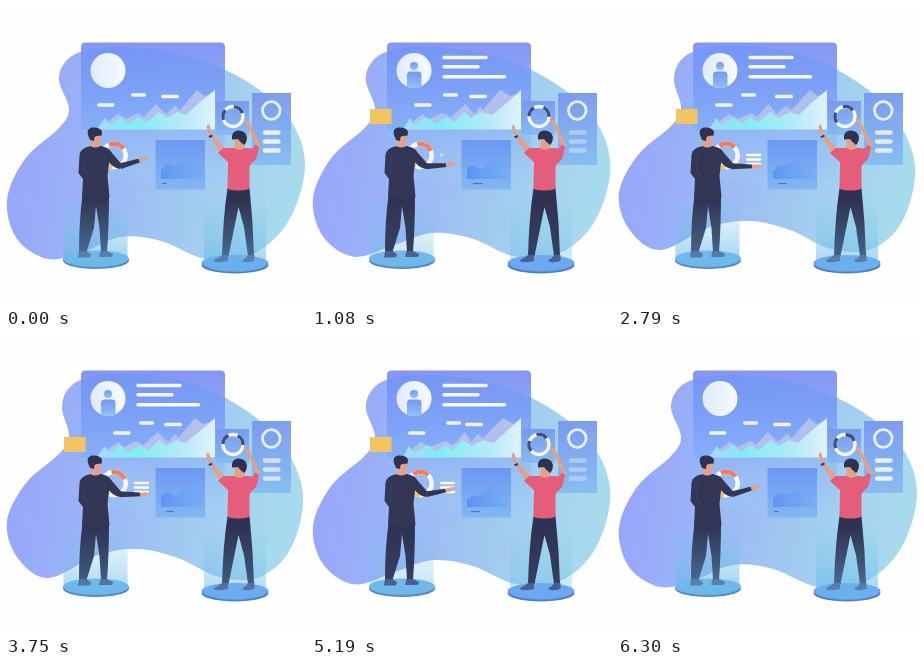
Animation, 300 px wide and 300 px high, one loop 6.33 s. Source, as an HTML page:

```html
<!DOCTYPE html>
<html lang="en">
<head>
<meta charset="utf-8">
<title>Dashboard team</title>
<style>
html, body { margin: 0; width: 100%; height: 100%; overflow: hidden; background: #fefefe; }
svg { display: block; width: 100vw; height: 100vh; }
.line { fill: none; stroke: #fff; stroke-linecap: round; }
.skin { fill: #e2a188; }
.hair { fill: #2f3150; }
.jacket { fill: #343656; }
.trousers { fill: #2f3252; }
.shoe { fill: #475583; }
</style>
</head>
<body>
<svg viewBox="0 0 300 300">
  <defs>
    <linearGradient id="gBlob" x1="0" y1="0" x2="1" y2="0.12">
      <stop stop-color="#96a2fb"/><stop offset=".3" stop-color="#9ab1f8"/>
      <stop offset=".65" stop-color="#a0c8f0"/><stop offset="1" stop-color="#a8daee"/>
    </linearGradient>
    <linearGradient id="gPanel" x1="0" y1="0" x2="0" y2="1">
      <stop stop-color="#7b8ff3" stop-opacity=".94"/><stop offset=".5" stop-color="#829ef4" stop-opacity=".88"/>
      <stop offset="1" stop-color="#96b8f6" stop-opacity=".8"/>
    </linearGradient>
    <linearGradient id="gLower" x1="0" y1="0" x2="0" y2="1">
      <stop stop-color="#8eb4f5" stop-opacity=".65"/><stop offset="1" stop-color="#9cc8f4" stop-opacity=".35"/>
    </linearGradient>
    <linearGradient id="gSide" x1="0" y1="0" x2="0" y2="1">
      <stop stop-color="#7798ef" stop-opacity=".95"/><stop offset="1" stop-color="#82b9f0" stop-opacity=".85"/>
    </linearGradient>
    <linearGradient id="gCard" x1="0" y1="0" x2="0" y2="1">
      <stop stop-color="#6c98f2"/><stop offset="1" stop-color="#82b8f2"/>
    </linearGradient>
    <linearGradient id="gBars" gradientUnits="userSpaceOnUse" x1="155" y1="173" x2="196" y2="152">
      <stop stop-color="#4f83f4"/><stop offset="1" stop-color="#76aef4" stop-opacity=".5"/>
    </linearGradient>
    <linearGradient id="gArea" x1="0" y1="0" x2="1" y2="0">
      <stop stop-color="#a5dcf8"/><stop offset=".3" stop-color="#7cf0f4"/>
      <stop offset=".7" stop-color="#b2ecf8"/><stop offset="1" stop-color="#e2f4fb"/>
    </linearGradient>
    <linearGradient id="gAvatar">
      <stop stop-color="#dfeafb"/><stop offset="1" stop-color="#f6fbff"/>
    </linearGradient>
    <linearGradient id="gBust" x1="0" y1="0" x2="0" y2="1">
      <stop stop-color="#7298f2"/><stop offset="1" stop-color="#94bff8"/>
    </linearGradient>
    <linearGradient id="gBeam" x1="0" y1="0" x2="0" y2="1">
      <stop stop-color="#78cbea" stop-opacity="0"/><stop offset=".5" stop-color="#70c2e8" stop-opacity=".3"/>
      <stop offset="1" stop-color="#68b8ea" stop-opacity=".65"/>
    </linearGradient>
    <clipPath id="panelClip"><path d="M75 124V41q0-4 4-4H215q4 0 4 4V124Z"/></clipPath>
    <g id="beamShapes" fill="url(#gBeam)">
      <path d="M57.500 190H121.500V253A32 8.500 0 0 1 57.500 253Z"/>
      <path d="M198 193H260V257.500A31 8.500 0 0 1 198 257.500Z"/>
    </g>
  </defs>

  <path id="blob" fill="url(#gBlob)"/>

  <path d="M75 124V41q0-4.500 4.500-4.500H214.500q4.500 0 4.500 4.500V124Z" fill="url(#gPanel)"/>
  <g clip-path="url(#panelClip)"><path id="sheen" fill="#669bfa" opacity=".34"/></g>
  <path d="M75 124H219V174H75Z" fill="url(#gLower)"/>

  <circle cx="102" cy="64.500" r="17.500" fill="url(#gAvatar)"/>
  <g id="bust" fill="url(#gBust)">
    <circle cx="102" cy="60" r="4"/>
    <path d="M95 81V69q0-3.500 3.500-3.500h7.500q3.500 0 3.500 3.500V81q-7 2-14.500 0Z"/>
  </g>
  <g id="titles" class="line" stroke-width="3.500" opacity=".93"></g>
  <g id="pills" class="line" stroke-width="3.600" opacity=".88"></g>

  <path id="backArea" fill="#bcc5ec" opacity=".85"/>
  <path id="frontArea" fill="url(#gArea)" opacity=".95"/>

  <path id="note" d="M58 103H79.500V118H58Z" fill="#f1c662"/>

  <g fill="none" stroke-width="4.500">
    <circle cx="108" cy="149.500" r="11.700" stroke="#f4f7fe"/>
    <path id="orangeArc" stroke="#ee8060"/><path id="yellowArc" stroke="#f1c662"/>
  </g>
  <g id="notes" class="line" stroke-width="2.300"></g>

  <rect x="149.500" y="134" width="49.500" height="49.500" fill="url(#gCard)"/>
  <g id="bars" fill="url(#gBars)"></g>
  <path id="cardDash" stroke="#4b73d8" stroke-width="1.200"/>

  <rect x="210" y="95" width="33" height="34" fill="url(#gSide)"/>
  <g fill="none" stroke-width="3.300">
    <circle cx="227" cy="110.500" r="10" stroke="#f4f7fe"/>
    <path id="darkArcA" stroke="#40507c"/><path id="darkArcB" stroke="#40507c"/>
  </g>
  <rect x="246" y="87" width="39" height="72" fill="url(#gSide)"/>
  <circle cx="265.300" cy="104.500" r="8.800" class="line" stroke-width="2.800" opacity=".82"/>
  <g id="sideLines" class="line" stroke-width="4.400"><path d="M259 126.500h13.500M259 135.500h13.500M259 144.500h13.500"/></g>

  <g id="discs"></g>
  <use href="#beamShapes" opacity=".55"/>

  <!-- presenter in a suit -->
  <g>
    <path class="trousers" d="M76.500 189H103Q103 220 101 246H95L93.500 222 90 200 88 222 80.500 246H73Q73 215 76.500 189Z"/>
    <path class="shoe" d="M73 245h7.500l4.500 3.500q0 2.500-3 3H72ZM94.500 245h6.500l6 3q0 3-3 3H93Z"/>
    <g id="forearm">
      <path class="jacket" d="M113 157.500 133 154 134.500 157.500 115 163Z"/>
      <path class="skin" d="M133 154.300q6-2.500 9.500-2.200 1.500.5.500 1.700l-5 3-4 .7Z"/>
    </g>
    <path class="jacket" d="M98 141q5 1 8 6l10 11.500-2 4.500q-8-1-14-11Z"/>
    <path class="jacket" d="M85 140Q74 142 73.500 149L72.500 167 77 173 76 191Q90 194 103.500 191L101.500 170 104 148Q103 142 95 140Z"/>
    <path d="M79 150 78.500 166 84 171" fill="none" stroke="#444867" stroke-width=".7"/>
    <path class="skin" d="M85 134h8.500v6.500q-4 2-8.500 0Z"/>
    <path class="skin" d="M83 127q1-4 6-4.500 6 0 6.500 5l-.5 7q-5 4-9.500.5Z"/>
    <path class="hair" d="M82 129q-2-6 4-7.500 8-.5 10 4l-.300 4-5.200.5-2 1-.5 4-4-1Z"/>
  </g>

  <!-- colleague in a red shirt -->
  <g>
    <path class="trousers" d="M221.500 182H243.500Q247 215 248 250H242L238 221 232.500 201 228 223 222.500 250H216Q217 212 221.500 182Z"/>
    <path class="shoe" d="M216 249h6v6q-7 2-14 .5 0-2.500 4-3.500ZM242 249h6.500v6q-6 2-12 .5 0-2.500 3-3Z"/>
    <g id="wave">
      <path class="skin" d="M214 147 203 129 200.500 121q1-4 3-2l2.200 9 12 13Z"/>
      <path d="M203 131 206.500 129.500" stroke="#34395c" stroke-width="2"/>
    </g>
    <path class="skin" d="M246 145 250 139 242 121 237.500 114q0-2 2-2l5 6.500L254 138 252 147Z"/>
    <path d="M212 147 217.500 142 230 142H240L247 142.500 249.500 138.500 253 141 250.500 152 243.500 160 243.500 183Q232 186 221.500 183L222 156Z" fill="#e45d7a"/>
    <path class="skin" d="M229 137h8.500l1 5q-5 3.500-10.500 0Z"/>
    <path class="skin" d="M227 130q1-5 7-5 6 1 6 7l-2 7q-5 2-9-1Z"/>
    <path class="hair" d="M226 133.500q-1-8 5.500-9 8-.5 9.500 6.500 0 5-3 8l-4-3.500-2-2.500Z"/>
  </g>

  <use id="glow" href="#beamShapes"/>
</svg>
<script>
const LOOP = 6330;
const $ = id => document.getElementById(id);
const clamp = v => Math.max(0, Math.min(1, v));
const smooth = v => { v = clamp(v); return v * v * (3 - 2 * v); };
const mix = (a, b, k) => a + (b - a) * k;
const set = (id, name, value) => $(id).setAttribute(name, value);

// Visible from start until end, easing in and out over `span`.
const show = (t, start, end, span) => smooth((t - start) / span) * (1 - smooth((t - end) / span));

const TIMES = [0, 1080, 1710, 2790, 3750, 5190, LOOP];
function track(t, values) {
  let i = 0;
  while (i < TIMES.length - 2 && t >= TIMES[i + 1]) i++;
  const k = (t - TIMES[i]) / (TIMES[i + 1] - TIMES[i]);
  return mix(values[i], values[(i + 1) % values.length], smooth(k));
}

const BLOB_LOW = [[53,74],[61,54],[82,44],[125,42],[185,51],[240,75],[283,112],[299,160],[282,216],[245,249],[200,253],
  [155,235],[115,231],[77,246],[42,253],[11,233],[1,194],[19,153],[53,122],[63,103]];
const BLOB_HIGH = [[56,74],[63,54],[84,43],[125,40],[185,49],[238,75],[277,111],[297,160],[285,214],[254,243],[213,243],
  [172,224],[132,215],[92,221],[42,244],[11,223],[1,187],[20,149],[53,120],[63,102]];

function closedCurve(pts) {
  const n = pts.length, at = i => pts[(i + n) % n];
  let d = `M${pts[0]}`;
  for (let i = 0; i < n; i++) {
    const [a, b, c, e] = [at(i - 1), at(i), at(i + 1), at(i + 2)];
    const c1 = b.map((v, j) => v + (c[j] - a[j]) / 6);
    const c2 = c.map((v, j) => v - (e[j] - b[j]) / 6);
    d += `C${c1} ${c2} ${c}`;
  }
  return d + 'Z';
}

function arc(cx, cy, r, from, to) {
  const p = deg => [cx + r * Math.cos(deg * Math.PI / 180), cy + r * Math.sin(deg * Math.PI / 180)];
  return `M${p(from)}A${r} ${r} 0 ${to - from > 180 ? 1 : 0} 1 ${p(to)}`;
}

const BACK = [[93,122],[112,108],[120,113],[132,107],[138,111],[150,98],[160,108],[169,100],[174,104],[191,84],[198,90],[209,87]];
const FRONT = [[91,123],[99,112],[104,119],[115,111],[123,118],[132,111],[141,116],[153,106],[161,112],[171,106],[180,109],[193,97],[209,84]];
function area(pts, t, sway) {
  const w = t / LOOP * Math.PI * 4;
  const top = pts.map(([x, y], i) => {
    const inner = i && i < pts.length - 1;
    return [x + (inner ? sway * (Math.sin(w + i) - Math.sin(i)) : 0), y];
  });
  return `M${top.join('L')}L209 123.500H91Z`;
}

const TITLES = [[132, 51.5, 42], [132, 60.8, 34], [132, 70.7, 60.5]];
const PILLS = [
  { y: 99, w: 14, x: [91, 102, 102, 97, 107, 96] },
  { y: 89, w: 11.5, x: [125, 131, 125, 123, 133, 134] },
  { y: 90.5, w: 14.5, x: [155, 157, 152, 157, 158, 153] }
];
const HAND = [150.5, 157.5, 148, 159, 159, 153.5];
const DISCS = [
  { x: 90, y: 253, r: 33, top: '#75b7ea', rim: '#5587c2' },
  { x: 229, y: 257.5, r: 33.5, top: '#6c9ef5', rim: '#4f7dc6' }
];

const addPaths = (id, count) => {
  $(id).innerHTML = '<path/>'.repeat(count);
  return [...$(id).children];
};
const titles = addPaths('titles', 3), pills = addPaths('pills', 3), notes = addPaths('notes', 3);

$('discs').innerHTML = DISCS.map(({ x, y, r, top, rim }) =>
  `<ellipse cx="${x}" cy="${y + 1.5}" rx="${r}" ry="8.500" fill="${rim}"/>
   <ellipse cx="${x}" cy="${y - .5}" rx="${r}" ry="8" fill="${top}"/>`).join('');

$('bars').innerHTML = '<rect width="3"/>'.repeat(14);
const bars = [...$('bars').children];

function growLine(path, x, y, w, k) {
  path.setAttribute('d', `M${x} ${y}h${w * k + .01}`);
  path.setAttribute('opacity', clamp(k * 8));
}

function draw(t) {
  const turn = t / LOOP * Math.PI * 2;
  const lift = smooth(1.25 * (.5 - .5 * Math.cos(turn)));
  const pulse = .5 + .5 * Math.cos(turn * 2);

  const shape = closedCurve(BLOB_LOW.map((p, i) => p.map((v, j) => mix(v, BLOB_HIGH[i][j], lift))));
  set('blob', 'd', shape);
  set('sheen', 'd', shape);

  const bust = show(t, 250, 5500, 450);
  set('bust', 'opacity', bust);
  set('bust', 'transform', `translate(0 ${3 * (1 - bust)})`);
  titles.forEach((p, i) => growLine(p, ...TITLES[i], show(t, 300 + i * 130, 5450 + i * 100, 450)));
  pills.forEach((p, i) => p.setAttribute('d', `M${track(t, PILLS[i].x) + 1.8} ${PILLS[i].y}h${PILLS[i].w}`));

  set('backArea', 'd', area(BACK, t, 2));
  set('frontArea', 'd', area(FRONT, t, 1.2));

  const note = show(t, 450, 5500, 400);
  set('note', 'opacity', clamp(note * 2));
  set('note', 'transform', `translate(79 118) scale(${note}) translate(-79 -118)`);

  const swing = 14 * Math.sin(turn * 2);
  set('orangeArc', 'd', arc(108, 149.5, 11.7, -115 + swing, -35 + swing));
  set('yellowArc', 'd', arc(108, 149.5, 11.7, 100 + swing, 130 + swing));
  notes.forEach((p, i) => growLine(p, 129, 149 + i * 4.5, 13, show(t, 1000 + i * 60, 5500, 500)));

  bars.forEach((bar, i) => {
    const h = 10 + i * .8 + 2 * Math.sin(i * 1.1) + 2 * Math.sin(turn * 2 + i * .5);
    bar.setAttribute('x', 155 + i * 2.9);
    bar.setAttribute('y', 173 - h);
    bar.setAttribute('height', h);
  });
  set('bars', 'opacity', mix(.8, .65, pulse));
  set('cardDash', 'd', `M${track(t, [156, 161, 160, 160, 160, 159])} 177.500h${track(t, [5, 10, 7, 9, 8, 9])}`);

  const spin = 25 * Math.sin(turn * 2);
  set('darkArcA', 'd', arc(227, 110.5, 10, -85 + spin, -20 + spin));
  set('darkArcB', 'd', arc(227, 110.5, 10, 160 + spin, 220 + spin));
  set('sideLines', 'opacity', mix(.22, .82, pulse));

  const angle = Math.atan2(track(t, HAND) - 160, 28) - Math.atan2(152.5 - 160, 28);
  set('forearm', 'transform', `rotate(${angle * 180 / Math.PI} 114 160)`);
  set('wave', 'transform', `rotate(${-2.5 * (1 - pulse)} 215 145)`);
  set('glow', 'opacity', mix(.05, .8, pulse));
}

function frame(now) {
  draw(now % LOOP);
  requestAnimationFrame(frame);
}
draw(0);
requestAnimationFrame(frame);
</script>
</body>
</html>
```
